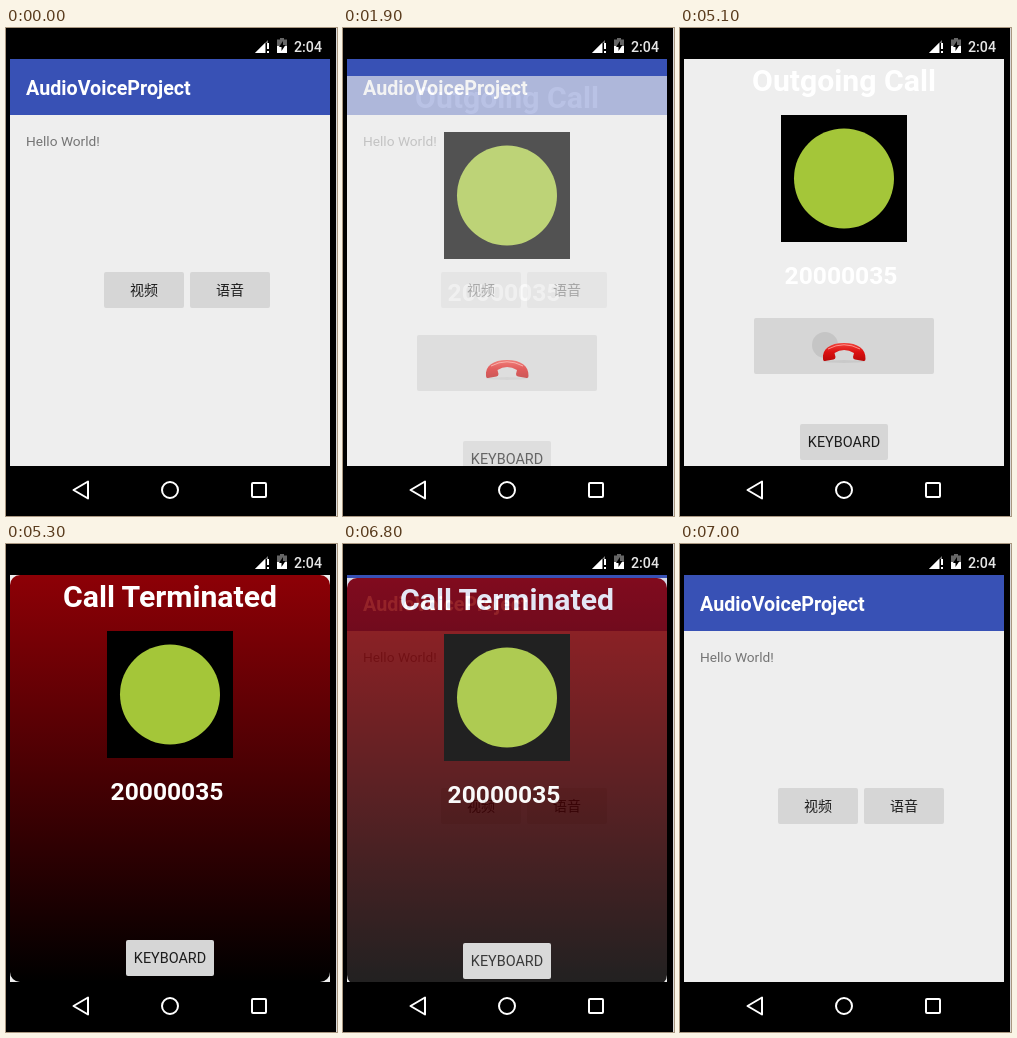
An HTML page for the animation above (8000 ms loop, 331 by 488 pixels).

```html
<!DOCTYPE html>
<html lang="en">
<head>
<meta charset="utf-8">
<style>
  html, body { margin: 0; width: 100%; height: 100%; overflow: hidden; background: #000; }
  svg { display: block; }
  text { font-family: Roboto, "Noto Sans CJK SC", "Noto Sans CJK", sans-serif; }
  .mid { text-anchor: middle; }
  .bold { font-weight: 700; fill: #fff; }
  .button { fill: #d6d6d6; }
  .label { font-size: 14px; fill: #1c1c1c; }
  .ripple { fill: #000; fill-opacity: .08; }
  .nav { fill: none; stroke: #fff; stroke-width: 2; stroke-linejoin: round; }
</style>
</head>
<body>
<svg width="331" height="488" viewBox="0 0 331 488">
  <defs>
    <linearGradient id="red" x1="0" y1="0" x2="0" y2="1">
      <stop stop-color="#8d0006"/>
      <stop offset="1" stop-color="#000"/>
    </linearGradient>
    <linearGradient id="handset" x1="0" y1="0" x2="0" y2="1">
      <stop stop-color="#f0443c"/>
      <stop offset=".5" stop-color="#dc1010"/>
      <stop offset="1" stop-color="#b80808"/>
    </linearGradient>
    <clipPath id="screen"><rect x="4" y="31" width="320" height="407"/></clipPath>
    <clipPath id="voice"><rect x="184" y="244" width="80" height="36" rx="2"/></clipPath>
  </defs>

  <rect width="331" height="488"/>
  <rect x="330" width="1" height="488" fill="#d8d8d8"/>

  <!-- status bar -->
  <path d="M249 25L262 12V25Z" fill="#777"/>
  <path d="M249 25L259 15V25Z" fill="#fff"/>
  <path d="M260 15h4v11h-4z"/>
  <path d="M261 15h2v6h-2zM261 23h2v2h-2z" fill="#fff"/>
  <path d="M274 10h4v1.500h3V18h-10v-6.500h3z" fill="#666"/>
  <path d="M271 18h10v7h-10z" fill="#fff"/>
  <path d="M277 13l-4 6h2.500v4l4-6h-2.500z"/>
  <text x="288" y="24" font-weight="500" font-size="14.200" fill="#e6e6e6">2:04</text>

  <g clip-path="url(#screen)">
    <!-- home -->
    <rect x="4" y="31" width="320" height="407" fill="#eee"/>
    <rect x="4" y="31" width="320" height="56" fill="#3851b5"/>
    <text x="20" y="67" font-weight="600" font-size="19.700" fill="#fff">AudioVoiceProject</text>
    <text x="20" y="118" font-size="13.700" fill="#757575">Hello World!</text>
    <rect x="98" y="244" width="80" height="36" rx="2" class="button"/>
    <rect x="184" y="244" width="80" height="36" rx="2" class="button"/>
    <g clip-path="url(#voice)"><circle id="voiceTap" cx="223.500" cy="243" r="28" class="ripple"/></g>
    <text x="138" y="267" class="label mid">视频</text>
    <text x="224" y="267" class="label mid">语音</text>

    <!-- call -->
    <g id="call">
      <rect x="4" y="31" width="320" height="407" fill="#eee"/>
      <rect id="ended" x="4" y="31" width="320" height="407" rx="10" fill="url(#red)"/>
      <text id="title" x="164" y="63" class="bold mid" font-size="30.200"></text>
      <rect x="101" y="87" width="126" height="127"/>
      <circle cx="164" cy="150.500" r="50" fill="#a4c639"/>
      <text x="161" y="256" class="bold mid" font-size="24.600">20000035</text>
      <g id="hangUp">
        <rect x="74" y="290" width="180" height="56" rx="2" class="button"/>
        <circle id="hangUpTap" cx="145" cy="317" r="13" class="ripple"/>
        <ellipse cx="164" cy="333.500" rx="21" ry="1.500" fill="#000" opacity=".06"/>
        <path d="M143 331C142 321 150 315 164 315S186 321 185.500 331Q185.500 333.500 183.500 333L175 331.500Q173 331 173 329L174 325Q164 319 154.500 325L155.500 329Q155.500 331 153.500 331.500L145 333Q143 333.500 143 331Z" fill="url(#handset)"/>
        <path d="M148 321Q164 312.500 180 321" fill="none" stroke="#ff8f88"/>
      </g>
      <rect x="120" y="396" width="88" height="36" rx="2" class="button"/>
      <text x="164" y="419" class="label mid" style="font-size: 14.400px">KEYBOARD</text>
    </g>
  </g>

  <!-- navigation bar -->
  <path d="M67.500 462L82 453.500V470.500Z" class="nav"/>
  <circle cx="164" cy="462" r="8" class="nav"/>
  <rect x="246" y="455" width="14" height="14" rx="1" class="nav"/>
</svg>
<script>
  const $ = id => document.getElementById(id);
  const show = (id, on) => $(id).setAttribute("display", on ? "inline" : "none");

  // Vertical offset and opacity of the call window
  function callPose(t) {
    if (t < 6700) {
      const s = Math.min(1, (t - 1900) / 200);
      return [17 * (1 - s) ** 2, Math.min(1, 0.65 + 0.7 * s)];
    }
    const s = (t - 6700) / 100;
    return [1 + 2 * s * s, 0.97 - 0.11 * s * s];
  }

  function draw(now) {
    const t = Math.floor(now % 8000 / 100) * 100; // the screen refreshes every 100 ms
    const ended = t >= 5200;
    const [y, alpha] = callPose(t);
    show("voiceTap", t === 1200);
    show("call", t >= 1900 && t < 7000);
    show("ended", ended);
    show("hangUp", !ended);
    show("hangUpTap", t === 5100);
    $("title").textContent = ended ? "Call Terminated" : "Outgoing Call";
    $("call").setAttribute("transform", `translate(0 ${Math.round(y)})`);
    $("call").setAttribute("opacity", alpha);
    requestAnimationFrame(() => draw(performance.now()));
  }
  draw(performance.now());
</script>
</body>
</html>
```
